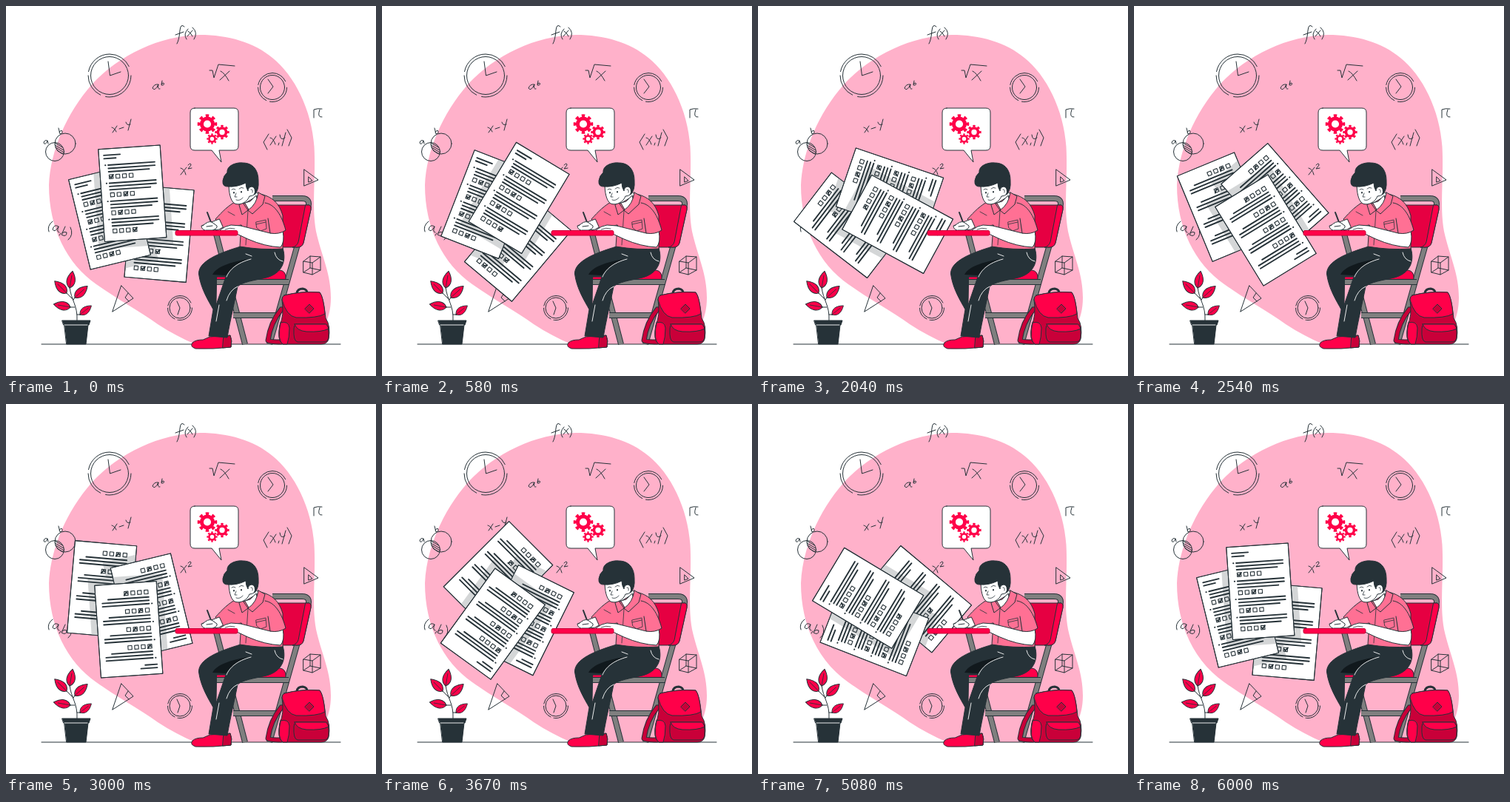
Write an HTML page that moves like this. It is 500 by 500 pixels and loops after 6040 ms.

```html
<!DOCTYPE html>
<html lang="en">
<head>
<meta charset="utf-8">
<title>Student taking a test</title>
<style>
html, body { margin: 0; height: 100%; overflow: hidden; background: #fff; }
svg { display: block; width: 100%; height: 100%; fill: none; stroke: #263238; stroke-linecap: round; stroke-linejoin: round; }
.red { fill: #ff0049; }
.mid { fill: #e60042; }
.deep { fill: #c90039; }
.dark { fill: #263238; }
.white { fill: #fff; }
.shirt { fill: #ff7094; }
.bare { stroke: none; }
.thin { stroke-width: .8; }
.shade { fill: #d4d6d7; stroke: none; }
.crease { stroke: #fff; stroke-width: .9; }
.tube { stroke-width: 8; stroke-linecap: butt; }
.core { stroke: #7f7f7f; stroke-width: 6; stroke-linecap: butt; }
</style>
</head>
<body>
<svg viewBox="0 0 500 500">
  <defs><clipPath id="lens"><circle cx="66" cy="197" r="12.5"/></clipPath></defs>
  <path class="bare" fill="#ffb1ca" d="M262 39C300 39 335 49 360 70C390 94 413 140 416.500 190C419 235 412 277 420.500 311C428 341 439 363 439 394C439 425 426 446 402 457H256C239 450 222 441 205 430C180 412 150 396 122 376C82 348 58 300 58 242C60 195 82 145 116 106C153 66 208 40 262 39Z"/>
  <path d="M48 457H452"/>

  <g id="clocks"></g>

  <!-- handwritten formulas -->
  <g>
    <path d="M241 28Q236 23 235 33Q234 46 231 51M229 39L240 35M246 31Q239 38 244 45M246 34Q249 35 252 41M252 33L245 41M252 29Q260 36 254 45"/>
    <path d="M206 106Q200 105 198 111Q201 116 206 106Q204 113 208 112M211 101L210 107Q215 107 213 104L210 105"/>
    <path d="M275 87L279 87L281 97L287 79L309 81M290 88Q295 90 301 101M302 88L289 100"/>
    <path d="M143 164Q147 165 149 170M150 162L144 171M153 166L159 164M162 157Q163 162 168 160M169 153L165 168"/>
    <path d="M236 219Q241 220 243 228M244 218L236 228M246 215Q250 211 250 215L246 220L251 219"/>
    <path d="M355 173L348 184L353 194M357 178Q361 178 364 187M365 176L357 188M369 185L368 188M370 174Q371 183 377 178M378 171L373 189M380 167L386 178L382 189"/>
    <path d="M416 151V140Q421 138 427 139M424 140Q420 151 427 150"/>
    <path d="M63 291Q55 297 58 305M71 298Q65 294 63 302Q66 307 71 298Q68 306 72 306M74 307L72 310M80 298L75 309Q82 313 82 306Q79 304 76 307M87 299Q92 309 84 316"/>
    <path d="M56 182Q52 180 51 185Q53 189 56 182L57 186M71 165L73 173Q78 172 75 168L72 170"/>
    <circle cx="66" cy="197" r="12.5"/><circle cx="80" cy="186" r="14"/>
    <path clip-path="url(#lens)" d="M67 182L80 190M66 185L80 193M66 188L80 196M67 191L80 199M69 195L80 202"/>
    <path d="M403 221L422 235L403 243ZM409 231L414 236L409 238Z"/>
    <path d="M156 378L172 395L144 413ZM165 388L161 394L166 399"/>
    <path d="M402 345L414 347V363L402 360ZM402 345L411 338L425 339L414 347M425 339V357L414 363M411 338V354L402 360M411 354L425 357"/>
  </g>

  <g id="papers"></g>

  <path class="white" d="M255 138H308Q314 138 314 144V189Q314 195 308 195H288L291 211L278 195H255Q249 195 249 189V144Q249 138 255 138Z"/>
  <g id="gears"></g>

  <!-- plant -->
  <path d="M96 425C97 404 88 398 86 380M91 397L82 388M91 397L93 394M93 407H86M96 417H101"/>
  <g id="leaves"></g>
  <path class="dark" d="M76 425H114L112 431H78ZM79 431H111L108 457H82Z"/>
  <path class="crease" stroke-width=".5" d="M79 431H110"/>

  <!-- chair -->
  <g id="frame"></g>
  <path class="mid" d="M364 269H410Q413 270 412 275L402 320Q400 326 394 326H372Z"/>
  <path class="red" d="M405 269H410Q413 270 412 275L402 320Q400 326 394 326H387Q393 325 395 319Z"/>
  <path class="red" d="M284 369Q285 358 298 357H370Q379 358 378 369Z"/>

  <!-- legs and shoe -->
  <path class="red" d="M276 447L303 445Q306 452 304 461Q280 464 256 463Q248 460 252 455Q256 451 266 451Z"/>
  <path class="deep" d="M294 448L303 445Q306 452 304 461L293 462Z"/>
  <path class="dark" fill-rule="evenodd" d="M317 325L374 327C380 347 371 362 352 367C334 371 320 373 313 379C309 400 303 424 299 448L274 446L280 410C274 399 263 382 260.500 362C260 345 287 334 317 325ZM285 366L297 366L284 404Z"/>
  <path class="bare" fill="#11191d" d="M327 342C303 346 285 352 279 363L297 364Q308 350 327 342Z"/>
  <path class="crease" d="M331 342C312 347 302 356 298 366M313 379Q302 384 298 398M288 404L284 426M363 333Q365 343 374 345M324 335L332 338"/>

  <!-- torso -->
  <path class="white" d="M322 262L336 250L345 257L332 278L322 272Z"/>
  <path class="shirt" d="M322 267L344 254C360 258 369 266 374 283L374 328Q345 330 316 325L318 296L293 300L283 288C292 278 301 269 311 264Z"/>
  <path class="white" d="M323 266L330 264L338 256L340 264L329 276Z"/>
  <path class="shirt" d="M341 252L350 257L347 268L333 281L327 276Q339 268 341 252ZM320 266L327 276L319 282L315 269Z"/>
  <path class="thin" d="M327 277L324 323M318 296Q321 302 317 309M338 292L351 289L352 301L344 304L339 300ZM338 295L351 292M300 278L309 283M356 276Q354 287 357 306"/>
  <path class="white" d="M288 288L264 297Q264 303 273 304L288 302L293 299Z"/>
  <path d="M272 279L280 300" stroke-width="2"/>
  <path class="white" d="M266 297Q273 290 278 292L285 297Q286 301 279 303H270M271 298L279 297"/>
  <path class="white" d="M289 303Q296 297 304 296L317 297L357 307L374 304Q377 319 371 326Q350 325 327 315L310 307Z"/>
  <path class="shirt" d="M350 266C364 268 373 284 378 303Q369 309 357 307L354 287"/>
  <path class="thin" d="M296 302Q303 299 309 301"/>
  <rect class="red" x="229" y="303.5" width="84" height="6.5" rx="2" stroke="#c90039"/>

  <!-- head -->
  <path class="white" d="M301 239C301 252 303 263 309 267C317 270 326 265 329 257Q337 257 337 249Q337 241 328 241L322 233Z"/>
  <path class="dark" d="M301 244Q292 245 293 236Q294 229 299 225C298 216 310 211 320 212C334 212 341 222 341 236Q342 249 336 255Q338 245 332 244Q327 245 327 250Q324 245 324 239Q312 245 301 244Z"/>
  <path class="thin" d="M305 248Q307 246 310 248M315 247Q318 244 321 246M311 253L309 258L312 258M311 262Q316 264 320 259M331 248Q334 247 333 252"/>
  <path stroke-width="2" d="M308 252v.6M318 251v.6"/>

  <!-- backpack -->
  <path stroke-width="7" d="M372 410C362 422 356 438 354 452Q356 454 372 454"/>
  <path stroke="#c90039" stroke-width="5" d="M372 410C362 422 356 438 354 452Q356 454 372 454"/>
  <path d="M393 388Q394 382 401 382Q407 383 407 388" stroke-width="3"/>
  <path class="deep" d="M376 391Q400 385 424 387Q429 393 432 422Q439 432 436 450Q434 457 426 457H374Q366 452 370 431Q376 419 373 397Q373 393 376 391Z"/>
  <path class="red" d="M371 428Q382 425 383 435Q383 448 380 457H374Q366 451 371 428Z"/>
  <path class="red" d="M376 391Q400 385 424 387Q429 393 431 416Q421 422 392 421Q379 419 373 397Q373 393 376 391Z"/>
  <path class="deep" d="M392 430H431Q437 431 436 448Q435 454 429 454H394Q388 453 389 436Q389 431 392 430Z"/>
  <path class="red" d="M390 430H433L436 436Q427 441 406 440Q393 439 390 430Z"/>
  <path class="deep" d="M404 409L410 403L416 409L410 415Z"/>
</svg>
<script>
const put = (id, html) => document.getElementById(id).innerHTML = html;
const each = (list, draw) => list.map(item => draw(...item)).join('');

// Clocks: full inner ring, broken outer ring
put('clocks', each([
  [140, 94, 29, 25.5, 'M138 75L140.500 94L155 89'],
  [360, 110, 19.5, 16.5, 'M354 99L361 109L354 118'],
  [235, 408, 16.5, 14, 'M231 399L235 408L232 417']
], (x, y, outer, inner, hands) =>
  `<circle cx="${x}" cy="${y}" r="${inner}"/>
   <circle cx="${x}" cy="${y}" r="${outer}" pathLength="100" stroke-dasharray="28 4 18 3 40 7"/>
   <path d="${hands}"/>`));

// Gears: solid ring plus eight teeth
put('gears', each([[272, 159.5, 13], [292, 170.5, 9.5], [278.5, 179.5, 7]], (x, y, r) => {
  const ring = (radius, width, extra) =>
    `<circle cx="${x}" cy="${y}" r="${radius}" stroke="#ff0049" stroke-width="${width}" ${extra}/>`;
  return ring(r * .58, r * .38, '') +
    ring(r * .87, r * .3, `pathLength="16" stroke-dasharray="1" stroke-dashoffset=".5" stroke-linecap="butt"`);
}));

put('leaves', each([
  [86, 381, 10], [82, 388, -45], [93, 394, 48], [87, 407, -80], [100, 417, 52, .85]
], (x, y, angle, size = 1) =>
  `<g transform="translate(${x} ${y}) rotate(${angle}) scale(${size})">
   <path class="red" d="M0 0C-8 -5 -7 -14 0 -23C7 -14 8 -5 0 0Z"/><path class="thin" d="M0 0V-17"/></g>`));

put('frame', each([
  ['M360 260H400Q412 260 408 273L356 457'], ['M284 308L323 457'],
  ['M284 373H382'], ['M307 418H365']
], d => `<path class="tube" d="${d}"/><path class="core" d="${d}"/>`));

// Papers: centre, tilt and the ticked box of each question
const papers = {
  right: [207, 307.5, 5, [1, 3, 4, 2]],
  left: [140, 285.5, -13.7, [2, 1, 1, 3]],
  front: [170.8, 253.3, -4, [1, 3, 2, 4]]
};
const place = ([x, y, tilt]) => `transform="translate(${x} ${y}) rotate(${tilt})"`;
const sheet = '<rect x="-41.8" y="-62.5" width="83.6" height="125"';

function question(tick, i) {
  const y = i * 24.5 - 40.5;
  let out = `<path stroke-width="1.9" d="M-30 ${y}H33M-30 ${y + 4.5}H33M-30 ${y + 9}H25M-34 ${y}h.4"/>`;
  for (let n = 0; n < 4; n++)
    out += `<rect x="${n * 9 - 29.6}" y="${y + 13.3}" width="5.2" height="5.2" stroke-width="1.1"/>`;
  return out + `<path stroke-width="1.8" d="M${tick * 9 - 37.6} ${y + 15.8}l1.5 1.5l3 -4"/>`;
}

function paper(name, casters) {
  const spec = papers[name];
  const shadows = casters.map(caster =>
    `<rect class="shade" x="-50.5" y="-60" width="101" height="132" ${place(papers[caster])}/>`).join('');
  return `<clipPath id="${name}">${sheet} ${place(spec)}/></clipPath>
    <g ${place(spec)}>${sheet} class="white"/></g>
    <g clip-path="url(#${name})">${shadows}</g>
    <g ${place(spec)}>${sheet}/>
      <path stroke-width="1.9" d="M-35 -54H-13M-35 -49.5H-19"/>
      ${spec[3].map(question).join('')}</g>`;
}
put('papers', paper('right', ['left', 'front']) + paper('left', ['front']) + paper('front', []));

// Clockwise turn of 2.5 degrees per step, 145 steps per loop
const LOOP = 6040, STEPS = 145;
const group = document.getElementById('papers');
const start = performance.now();
function tick() {
  const t = (performance.now() - start) % LOOP;
  const step = Math.floor((t + 4) * STEPS / LOOP);
  group.setAttribute('transform', `rotate(${step * 2.5} 168.3 279)`);
  requestAnimationFrame(tick);
}
tick();
</script>
</body>
</html>
```
